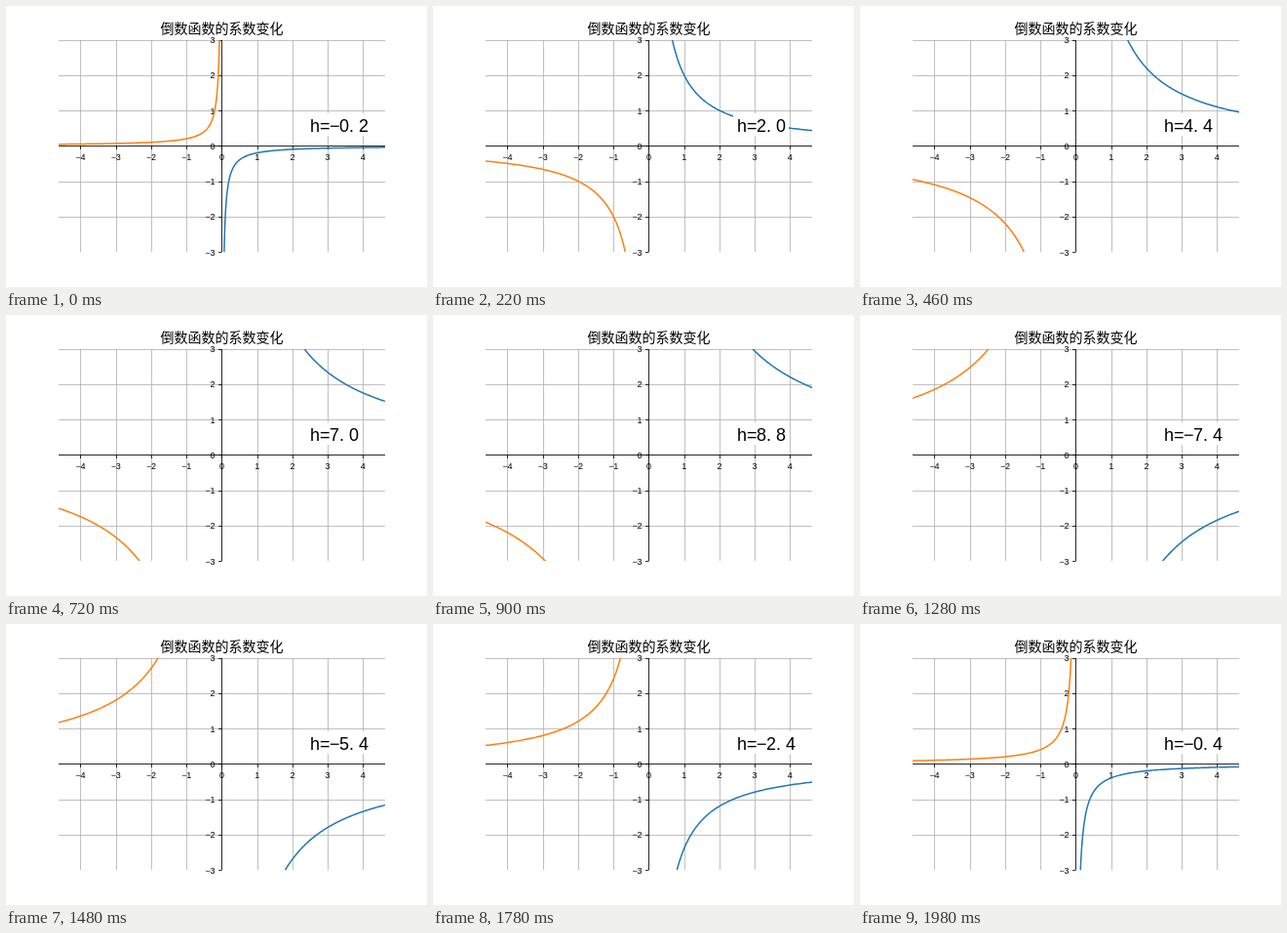
Recreate the animation shown at these times as an HTML page with a canvas. Size 432 px wide and 288 px high, loop 2000 ms.

```html
<!DOCTYPE html>
<html lang="zh-CN">
<head>
<meta charset="utf-8">
<title>倒数函数的系数变化</title>
<style>
html, body { margin: 0; width: 100%; height: 100%; overflow: hidden; background: #fff; }
canvas { display: block; width: 432px; height: 288px; }
</style>
</head>
<body>
<canvas id="plot" width="432" height="288"></canvas>
<script>
const ctx = document.getElementById('plot').getContext('2d');
const LOOP = 2000, STEP = 20;
const LEFT = 54, RIGHT = 389, TOP = 35, BOTTOM = 252;
const X0 = 221.4, Y0 = 143.28, UNIT = 36.24;
const SANS = '"Liberation Sans", Arial, sans-serif';

const px = x => X0 + x * UNIT;
const py = y => Y0 - y * UNIT;
const snap = v => Math.floor(v + 0.5) + 0.5;

function line(x1, y1, x2, y2, color) {
  ctx.strokeStyle = color;
  ctx.lineWidth = 0.8;
  ctx.beginPath();
  ctx.moveTo(x1, y1);
  ctx.lineTo(x2, y2);
  ctx.stroke();
}

// Half-width characters on a fixed pitch
function monoText(str, x, y, pitch) {
  ctx.fillStyle = '#000';
  ctx.textAlign = 'left';
  ctx.font = pitch * 1.8 + 'px ' + SANS;
  [...str].forEach((c, i) => ctx.fillText(c, x + i * pitch, y));
}

const label = n => (n < 0 ? '\u2212' : '') + Math.abs(n);

function clipToAxes() {
  ctx.beginPath();
  ctx.rect(LEFT, TOP, RIGHT - LEFT, BOTTOM - TOP);
  ctx.clip();
}

function drawGrid() {
  ctx.save();
  clipToAxes();
  for (let i = -4; i <= 4; i++) line(snap(px(i)), TOP, snap(px(i)), BOTTOM, '#b0b0b0');
  for (let j = -3; j <= 3; j++) line(LEFT, snap(py(j)), RIGHT, snap(py(j)), '#b0b0b0');
  ctx.restore();
}

function drawTicks() {
  for (let i = -4; i <= 4; i++) {
    const x = snap(px(i)), s = label(i);
    line(x, 143.5, x, 147, '#000');
    monoText(s, px(i) - s.length * 2.5, 157.5, 5);
  }
  for (let j = -3; j <= 3; j++) {
    const y = snap(py(j)), s = label(j);
    line(218, y, 221.5, y, '#000');
    monoText(s, 214.4 - s.length * 5, py(j) + 3.5, 5);
  }
}

function drawBranch(h, side, color) {
  const near = Math.max(Math.abs(h) / 4, 0.01), far = 5, n = 200;
  ctx.beginPath();
  for (let i = 0; i <= n; i++) {
    const x = side * near * Math.pow(far / near, i / n);
    ctx.lineTo(px(x), h ? py(h / x) : Math.floor(Y0));
  }
  ctx.strokeStyle = color;
  ctx.lineWidth = 1.5;
  ctx.lineJoin = 'round';
  ctx.stroke();
}

function drawCurves(h) {
  ctx.save();
  clipToAxes();
  drawBranch(h, 1, '#1f77b4');
  drawBranch(h, -1, '#ff7f0e');
  ctx.restore();
}

function drawValue(h, negative) {
  const s = 'h=' + (negative ? '\u2212' : '') + Math.abs(h).toFixed(1);
  ctx.fillStyle = '#fff';
  ctx.fillRect(308, 110, s.length * 10 + 7, 23);
  monoText(s, 312, 129, 10);
}

function draw(t) {
  const n = (Math.floor((t % LOOP) / STEP) + 49) % 100;
  const h = (n - 50) / 5;
  ctx.fillStyle = '#fff';
  ctx.fillRect(0, 0, 432, 288);
  drawGrid();
  drawTicks();
  drawCurves(h);
  line(snap(X0), TOP, snap(X0), BOTTOM, '#000');
  line(LEFT, snap(Y0), RIGHT, snap(Y0), '#000');
  drawValue(h, n <= 50);
  ctx.fillStyle = '#000';
  ctx.textAlign = 'center';
  ctx.font = '14px "Noto Sans CJK SC", "Noto Sans CJK", sans-serif';
  ctx.fillText('倒数函数的系数变化', X0, 28);
}

const start = performance.now();
function tick() {
  draw(performance.now() - start);
  requestAnimationFrame(tick);
}
tick();
</script>
</body>
</html>
```
